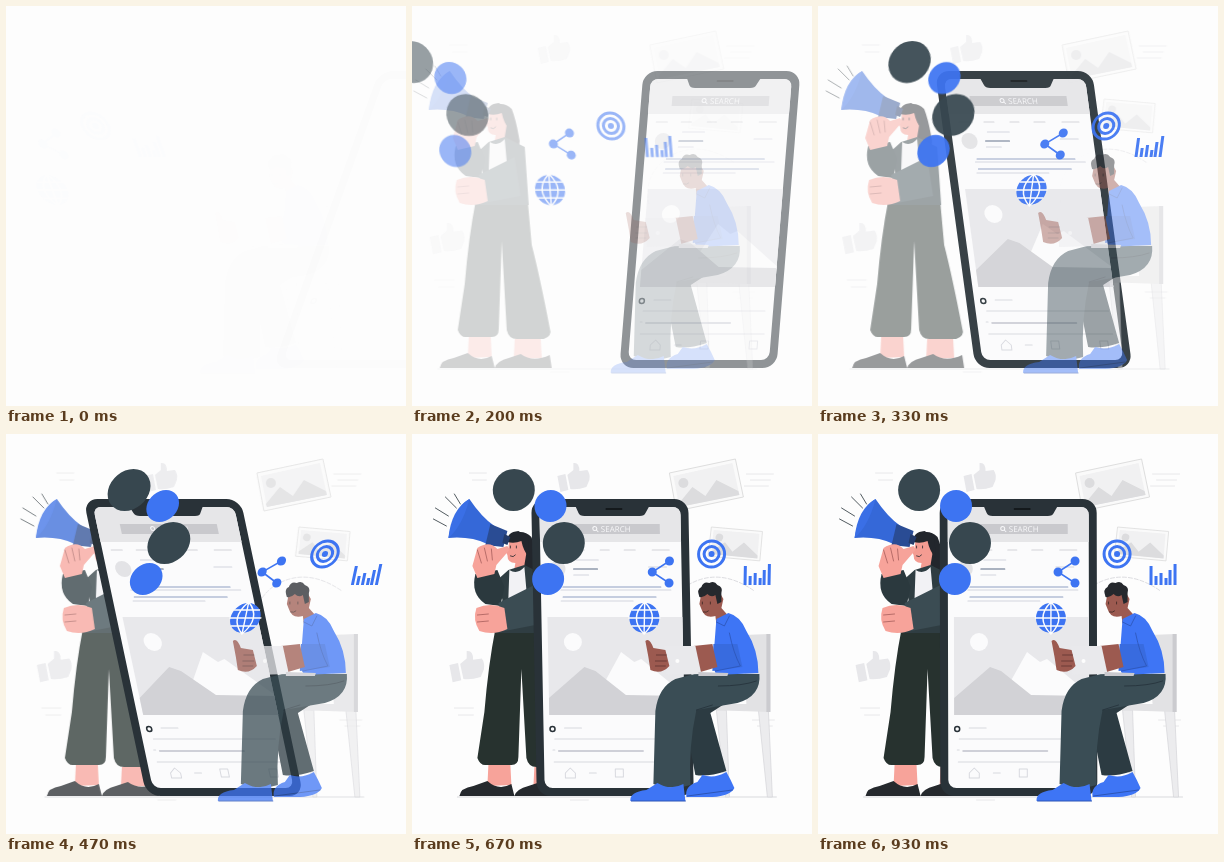
Write an HTML page that moves like this. It is 400x400 px and loops after 1000 ms.

```html
<!DOCTYPE html>
<html lang="en">
<head>
<meta charset="utf-8">
<style>
html, body { margin: 0; width: 100%; height: 100%; overflow: hidden; background: #fdfdfd; }
svg { display: block; width: 100vw; height: 100vh; }
.line { fill: none; stroke-linecap: round; stroke-linejoin: round; }
</style>
</head>
<body>
<svg viewBox="0 0 400 400">
  <defs>
    <g id="photo">
      <path d="M0 0L66-14L74 24L7 38Z" fill="#fafafa" stroke="#dedede"/>
      <path d="M4 3L63-10L70 22L10 34Z" fill="#f1f1f2"/>
      <circle cx="14" cy="10" r="5" fill="#dcdcde"/>
      <path d="M9 31L23 14L36 23L47 7L69 18L70 22L10 34Z" fill="#dcdcde"/>
    </g>
    <path id="thumb" d="M0 13L8 11L11 27L3 29ZM10 12L16 7L16 0Q22-1 22 8L30 7Q33 11 32 17L29 24Q20 27 13 26Z" fill="#e7e7ea"/>
  </defs>

  <g data-move="slide">
    <use href="#photo" x="257" y="39"/>
    <use href="#photo" transform="translate(299 93) rotate(17) scale(.76)"/>
    <use href="#thumb" x="145" y="29"/>
    <use href="#thumb" transform="translate(37 217) scale(1.08)"/>
    <path class="line" stroke="#e8e8ea" d="M57 39h17M60 46h14M334 40h27M338 46h20M332 52h24M42 274h19M46 281h15M340 286h22M345 292h15M158 366h18"/>
    <path class="line" stroke="#d4d4d8" stroke-width=".8" stroke-dasharray="4 2" d="M256 198Q250 170 274 152Q306 132 342 157"/>
    <path class="line" stroke="#c9cace" stroke-width=".7" d="M45 363H364"/>

    <!-- woman -->
    <path class="line" stroke="#263238" stroke-width=".8" d="M21 85L34 92M23 74L36 82M33 63L44 74M42 60L48 70"/>
    <path d="M98 101Q110 94 119 103Q123 113 126 130Q129 140 122 147L105 136L104 106Z" fill="#22262c"/>
    <path d="M97 106L110 102L114 119L112 131L114 138L101 140L103 129Q95 129 95 121L93 117L96 114Z" fill="#f49c92"/>
    <path d="M95 108Q94 98 106 97L116 103L117 124Q111 117 109 107Q102 110 95 108Z" fill="#22262c"/>
    <path class="line" stroke="#22262c" stroke-width=".8" d="M98 112v2M104 112v2M98 122q3 2 5-1"/>
    <path d="M83 195Q76 230 72 278L65 324Q68 332 74 331H99Q106 331 106 323L109 235L114 324Q116 333 124 333H151Q160 330 157 322Q147 270 139 239L135 195Z" fill="#27322f"/>
    <path d="M76 331H98L99 351L75 352ZM122 333H148L149 352L121 353Z" fill="#f7a39a"/>
    <path d="M47 362Q48 354 61 352L75 347Q86 357 99 350L102 362ZM102 362Q104 355 116 352L128 348Q140 357 157 349L159 362Z" fill="#25292d"/>
    <path d="M96 136L112 131L132 141L136 199L82 199L90 166L86 145Z" fill="#2f3d42"/>
    <path d="M97 136Q105 141 112 133L115 167L96 164Z" fill="#f2f2f5"/>
    <path d="M63 140L85 136L92 153L88 172L73 170Q58 160 63 140Z" fill="#2b393e"/>
    <path d="M86 169L122 151L128 190L92 197Z" fill="#3b4c53"/>
    <path d="M57 65Q42 73 36 104Q58 102 75 110L82 92Q69 83 57 65Z" fill="#3568d8"/>
    <path d="M57 65Q39 75 36 104Q50 92 57 65Z" fill="#3a6fe6"/>
    <path d="M78 90L95 97L91 113L73 111Z" fill="#2a4c94"/>
    <path d="M92 100L98 103L95 111L90 109Z" fill="#243a68"/>
    <path d="M65 114Q77 106 85 115L95 112L97 116L84 131L82 140L65 144L60 132Z" fill="#f7a39a"/>
    <path class="line" stroke="#a85f5c" stroke-width=".8" d="M65 116l4 13M72 114l3 13M79 115l1 11"/>
    <path d="M64 174Q78 168 92 174L95 195Q81 202 67 197Q60 186 64 174Z" fill="#f7a39a"/>
    <path class="line" stroke="#a85f5c" stroke-width=".8" d="M65 181l11-1M65 188l11-1"/>
  </g>

  <g data-move="speed" data-from="1" data-y="213">
    <rect x="122" y="65" width="157" height="297" rx="14" fill="#293238"/>
    <rect x="130" y="73" width="141" height="281" rx="8" fill="#fbfbfc"/>
    <path d="M130 108V81Q130 73 138 73H263Q271 73 271 81V108Z" fill="#e6e6e8"/>
    <path d="M166 72H240L236 79Q235 82 230 82H175Q170 82 169 79Z" fill="#293238"/>
    <path class="line" stroke="#14191c" stroke-width="2" d="M197 75h15"/>
    <rect x="153" y="90" width="97" height="10" fill="#c9c9cd"/>
    <circle cx="185" cy="94.500" r="2" fill="none" stroke="#f8f8fa"/>
    <path d="M186.500 96l2 2" stroke="#f8f8fa"/>
    <text x="191" y="98" font-family="Open Sans, sans-serif" font-size="8" fill="#f8f8fa">SEARCH</text>
    <path class="line" stroke="#d3d4da" stroke-width="1.200" d="M139 116h11M164 116h10M190 116h9M214 116h11M242 116h17"/>
    <circle cx="147" cy="135" r="8" fill="#e3e3e6"/>
    <path class="line" stroke="#5b6b84" d="M163 135h24"/>
    <path class="line" stroke="#8f9fc4" d="M152 153h98M152 163h93"/>
    <path class="line" stroke="#d3d6df" d="M163 141h15M150 156h110M150 167h72M166 126h22M238 133h18"/>
    <rect x="136" y="183" width="135" height="98" fill="#e8e8eb"/>
    <circle cx="161" cy="208" r="9" fill="#fbfbfc"/>
    <path d="M191 250L209 218L222 228L229 225L271 260V263H210Z" fill="#fbfbfc"/>
    <path d="M136 264L172 233L183 237L213 261L271 262V281H136Z" fill="#d2d2d6"/>
    <circle cx="139" cy="295" r="2.500" fill="#fbfbfc" stroke="#293238" stroke-width="1.500"/>
    <path class="line" stroke="#d8d9df" d="M151 294h17M141 305h122M140 328h124"/>
    <path class="line" stroke="#cfd0d8" stroke-width="2" d="M145 317h84"/>
    <path class="line" stroke="#d8d9df" d="M139 316h2M151 339l5-5l5 5v5h-10ZM201 335h8v8h-8ZM250 335h8v8h-8ZM175 339h7"/>
  </g>

  <g data-move="slide">
    <!-- chair -->
    <path d="M304 276L313 363H317L314 276ZM346 276L355 363H360L356 276Z" fill="#ececee" stroke="#d4d4d8" stroke-width=".7"/>
    <path d="M330 201L358 200L358 278L296 276V270H334Z" fill="#e2e2e4"/>
    <path d="M354 200L358 200V278H354Z" fill="#cbcbcf"/>

    <!-- man -->
    <path d="M279 255L330 250Q340 262 315 268L298 279L314 337Q296 343 283 341L271 280Z" fill="#2c3b42"/>
    <path d="M282 240H347Q349 262 325 269L284 276Q276 313 278 351Q260 357 241 350L243 277Q246 253 263 245Z" fill="#3a4d55"/>
    <path class="line" stroke="#25323a" stroke-width=".8" d="M344 247Q330 252 306 252M284 276L300 271"/>
    <path d="M218 367Q217 358 234 356L245 349Q258 357 271 350L273 367ZM274 363Q272 352 285 348L290 341Q302 345 314 338Q318 345 322 354Q318 362 300 363Z" fill="#3e75f5"/>
    <path class="line" stroke="#2c55b5" d="M219 367H273M275 362L320 356"/>
    <path d="M289 159L307 158L311 165L309 174L317 183L304 190L303 182Q292 185 289 175L287 170Z" fill="#9c5a50"/>
    <path d="M287 163Q284 155 289 153Q291 147 297 149Q302 146 305 151Q311 153 309 159L309 168L305 170L303 161Q299 164 295 160Q291 164 287 163Z" fill="#25282d"/>
    <path class="line" stroke="#3a2522" stroke-width=".8" d="M290 168v2M298 168v2M291 178q3 1 5-1"/>
    <path d="M304 185L316 179Q328 182 334 197Q346 216 346 239L304 241L301 234L302 211Z" fill="#3e75f5"/>
    <path d="M301 210L325 210L330 233L300 237Z" fill="#386bdf"/>
    <path class="line" stroke="#2c55b5" stroke-width=".8" d="M317 199Q321 219 328 232L303 237M304 188l8 4l5-10"/>
    <path d="M281 212L300 210L305 233L288 238L279 228Z" fill="#9c5a50"/>
    <path d="M252 212L283 212L289 240L254 241Z" fill="#e9e9ec"/>
    <path d="M286 238L316 239L315 242H286Z" fill="#c9c9ce"/>
    <circle cx="265" cy="227" r="2" fill="#fdfdfd"/>
    <path d="M233 207Q237 203 241 214L253 216L257 232Q249 241 238 236L236 223Z" fill="#9c5a50"/>
    <path class="line" stroke="#5f3430" stroke-width=".8" d="M244 221h10M243 227h11M243 232h10"/>
  </g>

  <g data-move="speed" data-from="-1" data-y="98">
    <g fill="#37474f"><circle cx="101" cy="56" r="21"/><circle cx="152" cy="109" r="21"/></g>
    <g fill="#3d74f2"><circle cx="138" cy="72" r="16"/><circle cx="137" cy="145" r="16"/></g>
  </g>

  <g data-move="speed" data-from="-1" data-y="152" fill="none" stroke="#3d74f2">
    <circle cx="299" cy="120" r="13" stroke-width="3"/>
    <circle cx="299" cy="120" r="7.500" stroke-width="3"/>
    <circle cx="299" cy="120" r="3" fill="#3d74f2" stroke="none"/>
    <path d="M257 127L240 138L257 149" stroke-width="1.500"/>
    <g fill="#3d74f2" stroke="none"><circle cx="257" cy="127" r="4.500"/><circle cx="240" cy="138" r="4.500"/><circle cx="257" cy="149" r="4.500"/></g>
    <path stroke-width="3" d="M333 132V151M338 142V151M343 139V151M348 144V151M352 136V151M357 130V151"/>
    <circle cx="233" cy="184" r="15" fill="#3d74f2" stroke="none"/>
    <path stroke="#fdfdfd" stroke-width="1.400" d="M233 168V200M217 184H249M220 176H246M220 192H246M233 168Q217 184 233 200Q249 184 233 168"/>
  </g>
</svg>
<script>
const parts = [...document.querySelectorAll('[data-move]')];
const mix = (a, b, p) => a + (b - a) * p;
const curve = (a, b, s) => 3 * (1 - s) ** 2 * s * a + 3 * (1 - s) * s * s * b + s ** 3;

// cubic-bezier(.36, -.01, .5, 1.38)
function ease(x) {
  let lo = 0, hi = 1;
  for (let i = 0; i < 20; i++) {
    const mid = (lo + hi) / 2;
    if (curve(.36, .5, mid) < x) lo = mid; else hi = mid;
  }
  return curve(-.01, 1.38, lo);
}

// Shift, skew in degrees and opacity of a part that shoots in.
function speed(t) {
  if (t < .6) {
    const p = ease(t / .6);
    return [mix(200, 0, p), mix(-20, 10, p), p];
  }
  if (t < .8) return [0, mix(10, -2, ease((t - .6) / .2)), 1];
  return [0, mix(-2, 0, ease((t - .8) / .2)), 1];
}

function place(part, slope, shift, alpha) {
  part.setAttribute('transform', `matrix(1 0 ${slope} 1 ${shift} 0)`);
  part.setAttribute('opacity', Math.max(0, Math.min(1, alpha)));
}

function draw(t) {
  const [shift, skew, alpha] = speed(t), p = ease(t);
  const k = Math.tan(skew * Math.PI / 180);
  for (const part of parts) {
    const { move, from, y } = part.dataset;
    if (move === 'slide') place(part, 0, mix(-24, 0, p), p);
    else place(part, from * k, from * (shift - k * y), alpha);
  }
}

// The picture steps 15 times a second, each step showing its middle.
const start = performance.now();
function loop() {
  const ms = (performance.now() - start) % 1000;
  let step = 14;
  while (Math.round(step * 20 / 3) * 10 > ms) step--;
  draw((step + .5) / 15);
  requestAnimationFrame(loop);
}
loop();
</script>
</body>
</html>
```
